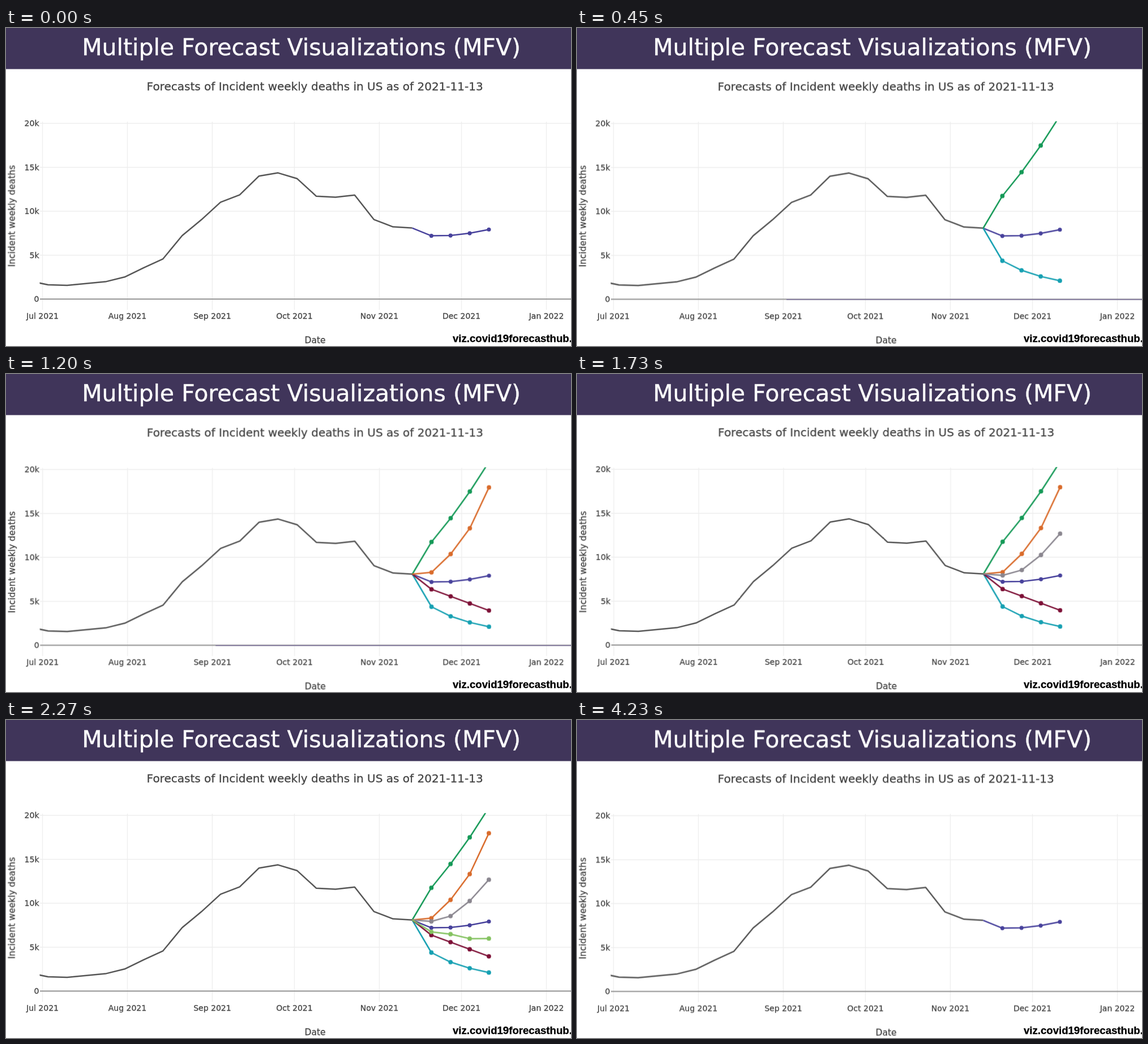
These frames come from a looping animation (998x561 px, 5.27 s). An HTML page:

```html
<!DOCTYPE html>
<html lang="en">
<head>
<meta charset="utf-8">
<title>Multiple Forecast Visualizations</title>
<style>
  html, body { margin: 0; width: 100%; height: 100%; overflow: hidden; background: #fff; }
  svg { display: block; width: 998px; height: 561px; }
  text { font-family: "DejaVu Sans", Verdana, sans-serif; fill: #444; }
  .head text { font-size: 41px; fill: #fff; stroke: #fff; stroke-width: .4px; }
  .title { font-size: 20px; }
  .tick { font-size: 14px; }
  .axis { font-size: 15.5px; }
  .title, .tick, .axis { stroke: #444; stroke-width: .3px; }
  .mid { text-anchor: middle; }
  .end { text-anchor: end; }
  .url { font: bold 18.6px "Liberation Sans", Arial, sans-serif; fill: #000; stroke: #000; stroke-width: .3px; }
  .grid { stroke: #eee; stroke-width: 1.4; }
  .line { fill: none; stroke-width: 2.5; stroke-linejoin: round; }

  .anim { animation: 5270ms step-end infinite; }
  .plot { animation-name: nudge; }
  .head { animation-name: settle; }
  .tint { animation-name: tint; }
  .s1 { animation-name: show1; }
  .s2 { animation-name: show2; }
  .s3 { animation-name: show3; }
  .s4 { animation-name: show4; }
  .s5 { animation-name: show5; }

  @keyframes nudge {
    0% { transform: translate(0, .3px); }
    2.466% { transform: translate(0, .6px); }
    22.77% { transform: translate(.2px, .6px); }
    32.827% { transform: translate(.5px, .2px); }
    43.073% { transform: translate(0, .3px); }
    50.663%, 100% { transform: translate(0, .9px); }
  }
  @keyframes settle {
    0% { transform: translate(0, 0); }
    50.663%, 100% { transform: translate(0, .3px); }
  }
  @keyframes tint { 0% { opacity: 0; } 2.466% { opacity: 1; } 32.827%, 100% { opacity: 0; } }
  @keyframes show1 { 0% { opacity: 0; } 2.466% { opacity: 1; } 50.663%, 100% { opacity: 0; } }
  @keyframes show2 { 0% { opacity: 0; } 12.713% { opacity: 1; } 50.663%, 100% { opacity: 0; } }
  @keyframes show3 { 0% { opacity: 0; } 22.77% { opacity: 1; } 50.663%, 100% { opacity: 0; } }
  @keyframes show4 { 0% { opacity: 0; } 32.827% { opacity: 1; } 50.663%, 100% { opacity: 0; } }
  @keyframes show5 { 0% { opacity: 0; } 43.073% { opacity: 1; } 50.663%, 100% { opacity: 0; } }
</style>
</head>
<body>
<svg viewBox="0 0 998 561">
  <defs><clipPath id="area"><rect x="59.5" y="164.5" width="940" height="330"/></clipPath></defs>
  <g class="plot anim">
    <text class="title" x="248.6" y="110">Forecasts of Incident weekly deaths in US as of 2021-11-13</text>
    <g id="axes"></g>
    <path d="M60 478H998" stroke="#949494" stroke-width="2"/>
    <path class="tint anim" d="M370 478H998" stroke="#8b83a3" stroke-width="1.8"/>
    <g id="series" clip-path="url(#area)"></g>
    <text class="axis mid" x="546" y="555.6">Date</text>
    <text class="axis mid" transform="translate(15.6 331.3) rotate(-90)">Incident weekly deaths</text>
  </g>
  <text class="url" x="789" y="554">viz.covid19forecasthub.</text>
  <g class="head anim">
    <rect y="-5" width="998" height="77.5" fill="#40355a"/>
    <text x="134.2" y="48.4">Multiple Forecast Visualizations (MFV)</text>
  </g>
</svg>
<script>
  const NS = "http://www.w3.org/2000/svg";
  const DAY = 4.837;
  const dayX = day => 64.5 + day * DAY;
  const weekX = week => dayX(2 + 7 * week);

  function add(parent, tag, attrs, label) {
    const el = document.createElementNS(NS, tag);
    for (const key in attrs) el.setAttribute(key, attrs[key]);
    if (label) el.textContent = label;
    return parent.appendChild(el);
  }

  const axes = document.getElementById("axes");
  const series = document.getElementById("series");

  const months = { Jul: 0, Aug: 31, Sep: 62, Oct: 92, Nov: 123, Dec: 153, Jan: 184 };
  for (const [name, day] of Object.entries(months)) {
    const x = dayX(day);
    add(axes, "path", { class: "grid", d: `M${x} 165V497` });
    add(axes, "text", { class: "tick mid", x, y: 512.7 }, `${name} ${name === "Jan" ? 2022 : 2021}`);
  }
  ["0", "5k", "10k", "15k", "20k"].forEach((label, i) => {
    const y = 478 - 77.5 * i;
    add(axes, "path", { class: "grid", d: `M60 ${y}H998` });
    add(axes, "text", { class: "tick end", x: 58.5, y: y + 4.8 }, label);
  });

  function line(parent, color, ys, firstWeek) {
    const points = ys.map((y, i) => `${weekX(firstWeek + i)},${y}`).join(" ");
    add(parent, "polyline", { class: "line", stroke: color, points });
  }

  const observed = [445.8, 452.6, 453.6, 450.5, 447.3, 439, 422.5, 407, 366, 338, 307,
    294, 261, 255.3, 265.5, 296.5, 298.3, 294.5, 337.5, 350.5, 352.5];
  line(series, "#565656", observed, -1);

  // color, reveal step (0 = always shown), weekly heights
  const forecasts = [
    ["#48429c", 0, 366.3, 365.8, 361.8, 355.2],
    ["#16a0b2", 1, 410, 426.8, 437.6, 445.2],
    ["#159957", 1, 295.7, 253.7, 206.7, 154.4],
    ["#7d1036", 3, 379.2, 391.6, 404.2, 416.6],
    ["#d96b2b", 2, 349.3, 317, 271.5, 199.4],
    ["#8a868f", 4, 355, 345.6, 319, 281.4],
    ["#84c260", 5, 373.4, 377.5, 385.4, 385.2]
  ];
  for (const [color, step, ...ys] of forecasts) {
    const group = add(series, "g", step ? { class: `s${step} anim` } : {});
    line(group, color, [352.5, ...ys], 19);
    ys.forEach((cy, i) => add(group, "circle", { cx: weekX(20 + i), cy, r: step ? 3.9 : 3.6, fill: color }));
  }
</script>
</body>
</html>
```
